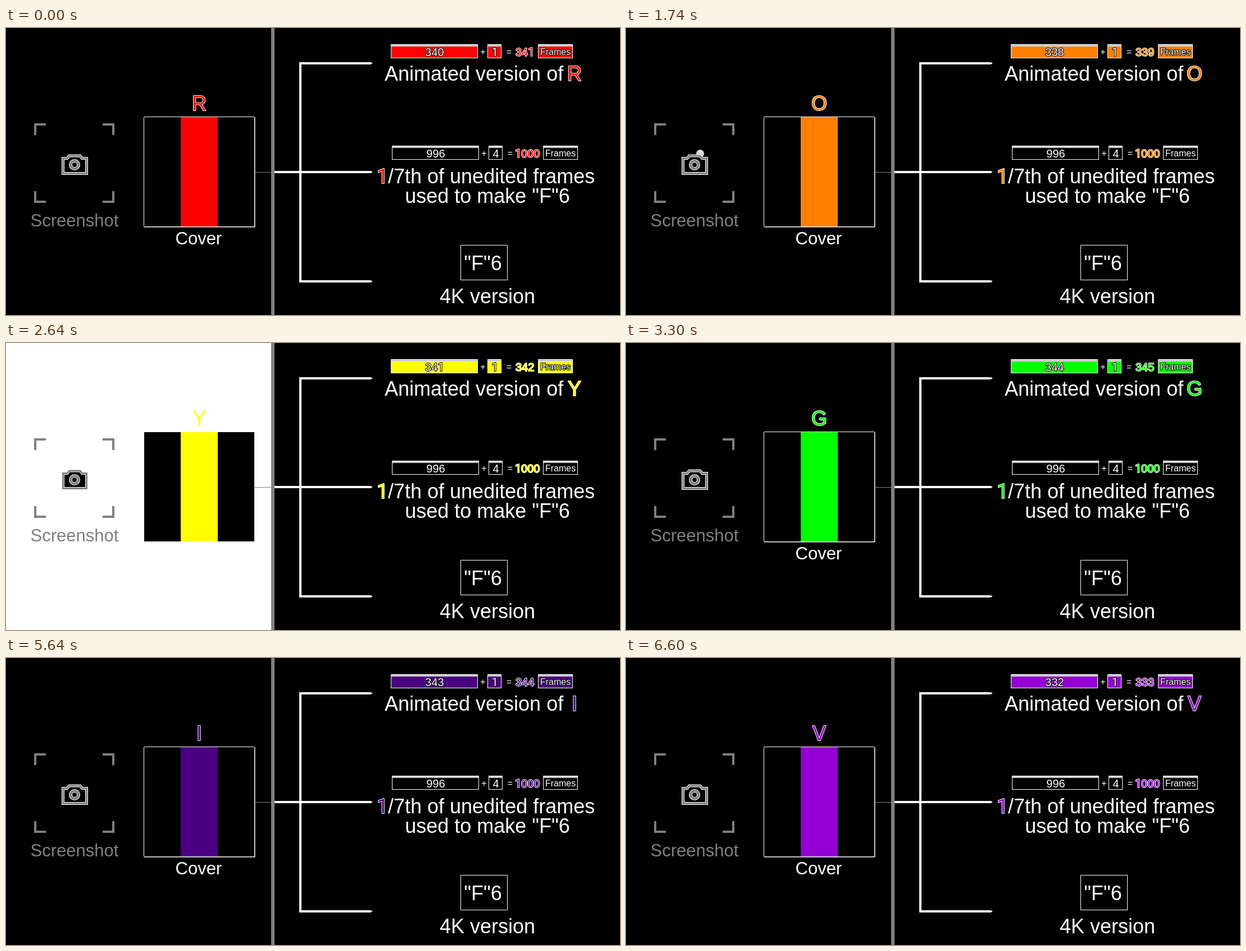
Animation, 1093 px wide and 512 px high, one loop 7740 ms. Source, as an HTML page with a canvas:

```html
<!DOCTYPE html>
<html lang="en">
<head>
<meta charset="utf-8">
<title>Colour covers</title>
<style>
  html, body { margin: 0; width: 100%; height: 100%; overflow: hidden; background: #000; }
  canvas { display: block; }
</style>
</head>
<body>
<canvas id="stage" width="1093" height="512"></canvas>
<script>
const ctx = document.getElementById('stage').getContext('2d');
const LOOP = 7740;
const GRAY = '#808080', WHITE = '#fff', BLACK = '#000';
const NAME = '"F"6';

const themes = [
  { at: 0,    letter: 'R', color: '#ff0000', count: 340 },
  { at: 1140, letter: 'O', color: '#ff8000', count: 338 },
  { at: 2280, letter: 'Y', color: '#ffff00', count: 341 },
  { at: 3300, letter: 'G', color: '#00ff00', count: 344 },
  { at: 4440, letter: 'B', color: '#0000ff', count: 334 },
  { at: 5460, letter: 'I', color: '#4b0082', count: 343 },
  { at: 6600, letter: 'V', color: '#9400d3', count: 332 }
];

// The lamp alternates bright and dim, then goes out before the shot.
const lampRuns = [
  [720, 960, 1260, 1440, 1740, 2280],
  [4020, 4260, 4620, 4860, 5160, 5640]
];
const shots = [2640, 6060];
const SHOT_LENGTH = 60;

function lampColor(t) {
  for (const run of lampRuns) {
    const passed = run.filter(at => at <= t).length;
    if (passed > 0 && passed < run.length) return passed % 2 ? '#dcdcdc' : GRAY;
  }
  return null;
}

function rect(x, y, w, h, color) {
  ctx.fillStyle = color;
  ctx.fillRect(x, y, w, h);
}

// The digit 1 is set in Roboto, which has no foot serif.
function text(str, x, y, size, { color = WHITE, outline = null, center = false } = {}) {
  str = String(str);
  const sans = size + 'px "Liberation Sans", Arial, sans-serif';
  const plainOne = size + 'px Roboto, sans-serif';
  const runs = str.split(/(1)/).filter(Boolean);
  ctx.font = sans;
  const widths = runs.map(run => ctx.measureText(run).width);
  if (center) x -= widths.reduce((a, b) => a + b, 0) / 2;

  const pass = paint => {
    let pen = x;
    runs.forEach((run, i) => {
      ctx.font = run === '1' ? plainOne : sans;
      paint(run, pen);
      pen += widths[i];
    });
  };
  if (outline) {
    ctx.strokeStyle = outline;
    ctx.lineWidth = 2;
    ctx.lineJoin = 'round';
    pass((run, pen) => ctx.strokeText(run, pen, y));
  }
  ctx.fillStyle = color;
  pass((run, pen) => ctx.fillText(run, pen, y));
}

function bracket(x, y, dx, dy) {
  rect(dx > 0 ? x : x - 21, dy > 0 ? y : y - 4, 21, 4, GRAY);
  rect(dx > 0 ? x : x - 4, dy > 0 ? y : y - 21, 4, 21, GRAY);
}

function ring(x, y, r, width, color) {
  ctx.beginPath();
  ctx.arc(x, y, r, 0, Math.PI * 2);
  ctx.lineWidth = width;
  ctx.strokeStyle = color;
  ctx.stroke();
}

function camera(lamp) {
  if (lamp) {
    ctx.beginPath();
    ctx.arc(132, 224, 7, 0, Math.PI * 2);
    ctx.fillStyle = lamp;
    ctx.fill();
  }
  const body = new Path2D('M101.5 232.5H109L112.5 228H132L135.5 232.5H143.5V259.5H101.5Z');
  ctx.lineJoin = 'miter';
  ctx.fillStyle = BLACK;
  ctx.fill(body);
  ctx.strokeStyle = WHITE;
  ctx.lineWidth = 5;
  ctx.stroke(body);
  ctx.strokeStyle = GRAY;
  ctx.lineWidth = 3;
  ctx.stroke(body);
  ring(122, 244, 7, 6, WHITE);
  ring(122, 244, 7, 4, GRAY);
}

// A box with a perforated strip along its top edge.
function filmBox(x, y, w, fill) {
  rect(x, y, w, 25, WHITE);
  rect(x + 1, y + 4, w - 2, 20, fill);
  for (let i = x + 1; i < x + w - 1; i += 2) rect(i, y + 2, 1, 1, BLACK);
}

function sumRow(x, y, count, extra, theme, fill) {
  const outline = BLACK;
  filmBox(x, y, 155, fill);
  filmBox(x + 172, y, 25, fill);
  text(count, x + 78, y + 21, 20, { outline, center: true });
  text('+', x + 164, y + 19, 16, { center: true });
  text(extra, x + 185, y + 21, 20, { outline, center: true });
  text('=', x + 210.5, y + 19, 16, { center: true });
  text(count + extra, x + (extra === 1 ? 222 : 219), y + 21, 20,
    { color: theme.color, outline: WHITE });
}

function framesBox(x, y, fill) {
  filmBox(x, y, 62, fill);
  text('Frames', x + 4, y + 19, 16, { outline: BLACK });
}

function arm(x, y) {
  rect(x, y, 650 - x, 4, WHITE);
  rect(650, y + 1, 2, 2, WHITE);
}

function leftPanel(theme, lamp, shot) {
  if (shot) rect(0, 0, 472, 512, WHITE);
  bracket(50, 170, 1, 1);
  bracket(193, 170, -1, 1);
  bracket(50, 312, 1, -1);
  bracket(193, 312, -1, -1);
  camera(lamp);
  text('Screenshot', 43.5, 354, 31, { color: GRAY });

  rect(246, 158, 196, 1, WHITE);
  rect(245, 159, 1, 195, WHITE);
  rect(442, 159, 1.5, 196, WHITE);
  rect(246, 354, 197, 1.5, WHITE);
  rect(246, 159, 196, 195, BLACK);
  rect(311, 159, 66, 195, theme.color);
  text(theme.letter, 344, 147, 36, { color: theme.color, outline: WHITE, center: true });
  text('Cover', 301.5, 386, 31);
  rect(443, 257, 29, 1, GRAY);
}

function rightPanel(theme) {
  rect(472, 0, 6, 512, GRAY);
  rect(522, 61, 4, 393, WHITE);
  arm(522, 61);
  arm(478, 255);
  arm(522, 450);

  sumRow(685, 29, theme.count, 1, theme, theme.color);
  framesBox(947, 29, theme.color);
  text('Animated version of', 674, 94, 36);
  text(theme.letter, 1012, 94, 36, { color: theme.color, outline: WHITE, center: true });

  sumRow(687, 210, 996, 4, theme, BLACK);
  framesBox(956, 210, BLACK);
  text('1', 660, 277, 36, { color: theme.color, outline: WHITE });
  text('/7th of unedited frames', 680, 277, 36);
  text('used to make ' + NAME, 857, 312, 36, { center: true });

  ctx.strokeStyle = WHITE;
  ctx.lineWidth = 1;
  ctx.lineJoin = 'miter';
  ctx.strokeRect(809.5, 387.5, 83, 62);
  text(NAME, 849, 432, 36, { center: true });
  text('4K version', 772, 491, 36);
}

function draw() {
  const t = performance.now() % LOOP;
  const theme = themes.filter(th => th.at <= t).pop();
  const shot = shots.some(at => t >= at && t < at + SHOT_LENGTH);
  rect(0, 0, 1093, 512, BLACK);
  leftPanel(theme, lampColor(t), shot);
  rightPanel(theme);
  requestAnimationFrame(draw);
}
draw();
</script>
</body>
</html>
```
